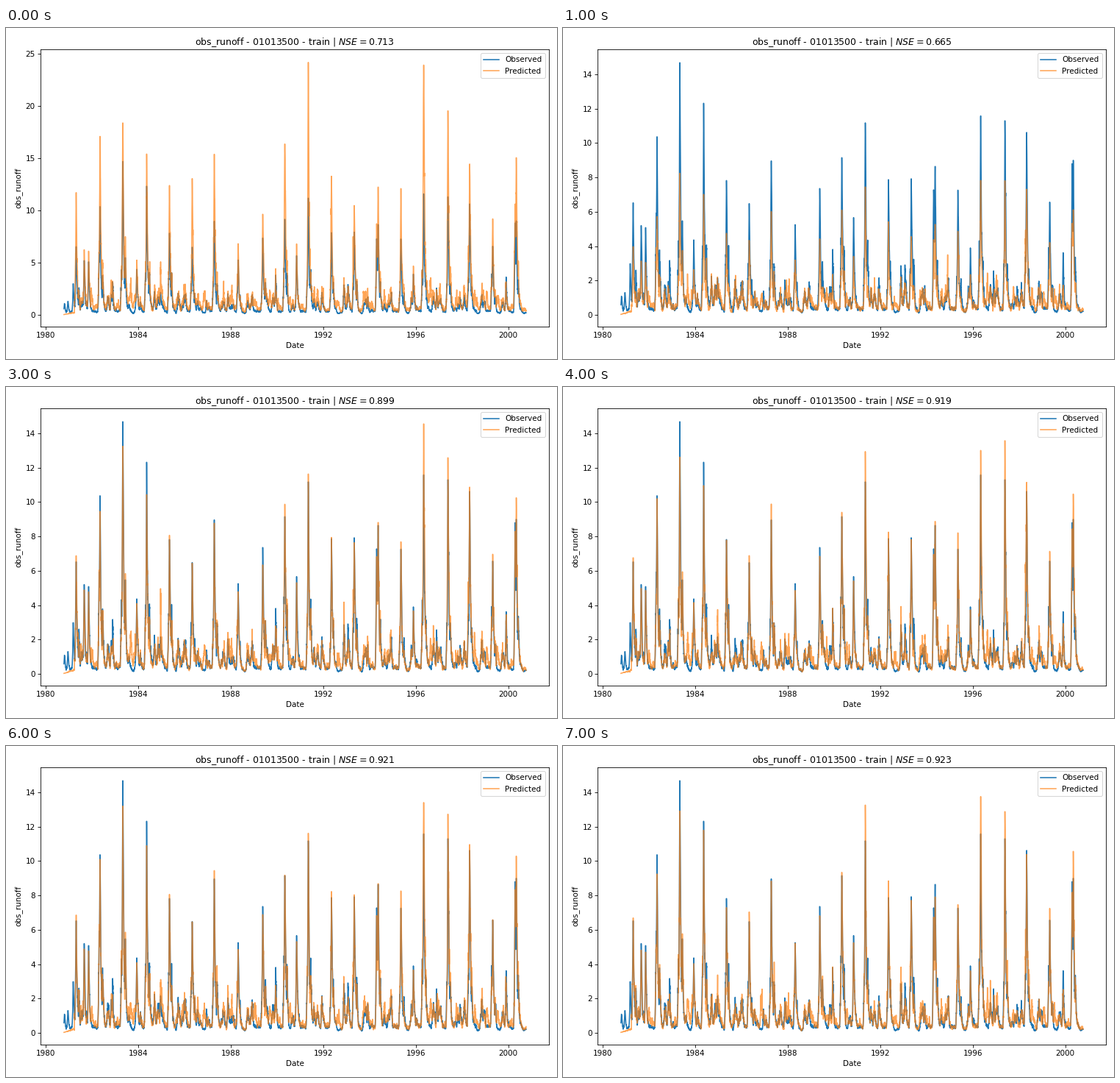
Animation, 750 px wide and 450 px high, one loop 8000 ms. Source, as a matplotlib script:

```python
import numpy as np
import matplotlib.pyplot as plt
from matplotlib.animation import FuncAnimation

W, H, DPI = 750, 450, 75
t = 0.777 + np.arange(7305) / 365.25            # years after 1980

# Crests of the yearly spring floods: date, runoff
springs = np.array([
    (1.304, 6.6), (2.337, 10.4), (3.323, 14.7), (4.356, 12.4), (5.342, 7.9),
    (6.327, 6.5), (7.281, 9.0), (8.315, 5.3), (9.380, 7.4), (10.334, 9.2),
    (11.351, 11.2), (12.353, 7.9), (13.339, 8.0), (14.372, 8.7),
    (15.358, 7.3), (16.343, 11.7), (17.393, 11.3), (18.331, 10.7),
    (19.332, 6.6), (20.350, 9.0)])

# The few large floods outside the spring crest
others = np.array([
    (.80, 1.1), (.95, 1.3), (1.176, 3), (1.653, 5.2), (1.844, 5.1),
    (3.434, 5.5), (3.927, 4.4), (10.843, 5.7), (14.308, 7.3),
    (15.898, 3.9), (20.302, 8.9)])

SCORES = [.713, .665, .870, .899, .919, .919, .921, .923]


def smooth_noise(rng, days):
    kernel = np.exp(-np.arange(6 * days) / days)
    kernel /= np.sqrt(np.sum(kernel ** 2))
    return np.convolve(rng.normal(size=t.size), kernel)[:t.size]


def flood_shape(dates, width):
    """Steep rise, rounded crest and long recession, one row per flood."""
    d = (t - dates[:, None]) / width
    ahead, after = np.clip(-d, 0, None), np.clip(d, 0, None)
    rise = np.exp(-(ahead / .03) ** 1.3)
    fall = .6 * np.exp(-(after / .035) ** 1.5) + .4 * np.exp(-after / .1)
    return np.where(d < 0, rise, fall)


def envelope(floods, width=1):
    return np.max(flood_shape(floods[:, 0], width) * floods[:, 1:], axis=0)


def make_minor(rng):
    """Pulses around every spring flood and one flood each late autumn."""
    dates, crests = springs.T
    n = len(dates)
    early = np.c_[dates - rng.uniform(.03, .06, n),
                  crests * rng.uniform(.2, .5, n)]
    late = np.c_[dates + rng.uniform(.07, .13, n),
                 crests * rng.uniform(.25, .42, n)]
    autumn = np.c_[np.arange(1, n) + rng.uniform(.84, .98, n - 1),
                   rng.uniform(1.2, 3.3, n - 1)]
    return np.vstack([early, late, autumn])


def make_bumps(rng, count):
    """Low, broad bumps from early summer to the middle of winter."""
    dates = rng.integers(1, 20, count) + rng.uniform(.5, 1.1, count)
    return np.c_[dates, rng.uniform(.5, 1.6, count)]


def scaled(floods, factor):
    return floods * np.c_[np.ones(len(floods)), np.broadcast_to(factor, len(floods))]


rng = np.random.default_rng(3)
minor = make_minor(rng)
bumps = make_bumps(rng, 75)
extra = make_bumps(rng, 45)
bias = np.exp(rng.normal(0, .12, len(minor)))
slow_error = smooth_noise(rng, 25)
base = .25 + .1 * np.cos(2 * np.pi * (t - .1))
crest = flood_shape(np.r_[springs[:, 0], others[:, 0]], 1).max(axis=0)


def runoff(spring, other, small, low, floor, noise):
    flow = np.max([envelope(spring), envelope(other), envelope(small),
                   envelope(low, 2), floor], axis=0)
    return flow * np.exp(noise * (1 - crest))   # crests stay exact


observed = runoff(springs, others, minor, bumps, base,
                  .2 * smooth_noise(rng, 9))


def predict(stage):
    """Overshoots at first, then too low, then settles on the record."""
    rng = np.random.default_rng(100 + stage)
    year = np.arange(len(springs))
    swing = np.cos(2 * np.pi * year / 5)        # some springs overshoot more
    trend = .01 * (year - 10)
    if stage == 0:
        gain, low_gain, lift = 1.6 + .38 * swing + trend, 1.4, .25
    else:
        level = 1.03 - .39 * np.exp(-2.5 * (stage - 1))
        gain = level * (1 + .08 * swing + trend)
        low_gain, lift = .95 + .1 * level, .08
    gain = gain * np.exp(rng.normal(0, .04, len(springs)))
    other_gain = .92 * np.median(gain)
    noise = (.12 * slow_error + .12 * smooth_noise(rng, 10)
             + .16 * smooth_noise(rng, 3))
    flow = runoff(scaled(springs, gain), scaled(others, min(other_gain, 1.2)),
                  scaled(minor, min(other_gain, 1.2) * bias),
                  scaled(np.vstack([bumps, extra]), low_gain),
                  base + lift, noise)
    warm_up = .03 + .4 * (t - t[0]) * (1 + .15 * smooth_noise(rng, 5))
    return np.where(t < 1.23, warm_up, flow)


fig = plt.figure(figsize=(W / DPI, H / DPI), dpi=DPI, facecolor="white")
ax = fig.add_axes([47 / W, 1 - 406 / H, 692 / W, 377 / H])
ax.plot(1980 + t, observed, color="C0", label="Observed")
line, = ax.plot([], [], color="C1", alpha=.7, label="Predicted")
years = range(1980, 2001, 4)
ax.set_xticks(years, [str(y) for y in years])
ax.set_xlim(1979.763, 2001.763)
ax.set_xlabel("Date")
ax.set_ylabel("obs_runoff")
ax.legend(loc="upper right")
title = ax.set_title("")


def draw(stage):
    line.set_data(1980 + t, predict(stage))
    if stage == 0:
        ax.set_ylim(-1.127, 25.42)
        ax.set_yticks(range(0, 26, 5))
    else:
        ax.set_ylim(-.685, 15.454)
        ax.set_yticks(range(0, 15, 2))
    title.set_text(f"obs_runoff - 01013500 - train | $NSE={SCORES[stage]:.3f}$")
    return line, title


anim = FuncAnimation(fig, draw, frames=len(SCORES), interval=1000, repeat=True)
plt.show()
```
